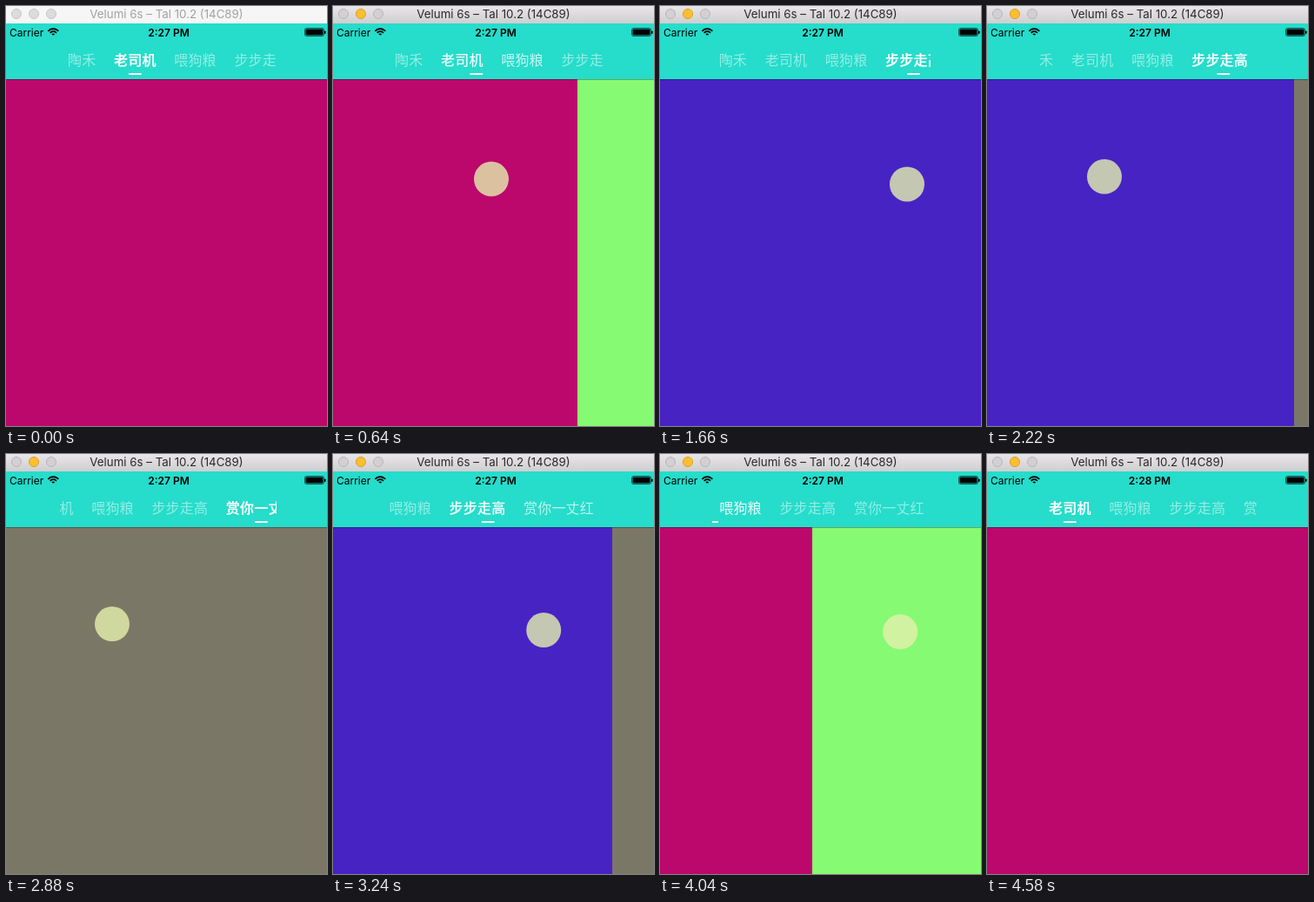
An HTML page with a canvas for the animation above (5120 ms loop, 369 px wide and 482 px high).

```html
<!DOCTYPE html>
<html lang="zh">
<head>
<meta charset="utf-8">
<style>
html, body { margin: 0; width: 369px; height: 482px; overflow: hidden; }
canvas { display: block; }
</style>
</head>
<body>
<canvas id="stage" width="369" height="482"></canvas>
<script>
const W = 369, H = 482, TITLE_H = 20, NAV_END = 84, LOOP = 5120;
const ctx = document.getElementById('stage').getContext('2d');
const UI = 'Inter, Roboto, sans-serif';
const CJK = '"Noto Sans CJK SC", "Noto Sans CJK", sans-serif';

const clamp = v => Math.max(0, Math.min(1, v));
const mix = (a, b, u) => a + (b - a) * u;
const smooth = u => u * u * (3 - 2 * u);
const easeOut = u => 1 - (1 - u) ** 2;

const pageColors = ['#2a9fd6', '#bc076c', '#86fa73', '#4823c4', '#7b7766'];
const view = { left: 60, right: 311, pad: 11 };
const charW = 16.2, gap = 20.6;
let nextX = view.left + view.pad;
const tabs = ['陶禾', '老司机', '喂狗粮', '步步走高', '赏你一丈红'].map(label => {
  const x = nextX, w = label.length * charW;
  nextX += w + gap;
  return { label, x, w, mid: x + w / 2 };
});

// Three swipes forward, three back: [start, duration]
const swipes = [[570, 560], [1190, 405], [2210, 487], [2960, 440], [3521, 355], [3950, 330]];
const SCROLL_MS = 300;

// Pointer turning points: [time, x]
const pointer = [
  [80, 395], [450, 290], [800, 100], [1180, 282], [1400, 95], [1660, 284], [2220, 135],
  [2400, 60], [2880, 122], [3120, 310], [3420, 120], [3580, 301], [3900, 130],
  [4100, 315], [4560, 395]
];

// Smallest scroll that brings a tab fully into view
function reveal(tab, scroll) {
  const toEnd = tab.x + tab.w + view.pad - view.right;
  const toStart = tab.x - view.pad - view.left;
  return Math.min(Math.max(scroll, toEnd), toStart);
}

function poseAt(t) {
  let page = 1, target = 1, scroll = 0;
  swipes.forEach(([start, duration], i) => {
    const dir = i < 3 ? 1 : -1;
    target += dir;
    page += dir * easeOut(clamp((t - start) / duration));
    const u = clamp((t - start - duration) / SCROLL_MS);
    scroll = mix(scroll, reveal(tabs[target], scroll), smooth(u));
  });
  return { page, scroll };
}

function rect(color, x, y, w, h) {
  ctx.fillStyle = color;
  ctx.fillRect(x, y, w, h);
}

function pill(color, x, y, w, h, r) {
  ctx.fillStyle = color;
  ctx.beginPath();
  ctx.roundRect(x, y, w, h, r);
  ctx.fill();
}

function disc(color, x, y, r, edge) {
  ctx.beginPath();
  ctx.arc(x, y, r, 0, Math.PI * 2);
  ctx.fillStyle = color;
  ctx.fill();
  if (!edge) return;
  ctx.lineWidth = 1;
  ctx.strokeStyle = edge;
  ctx.stroke();
}

function text(str, x, y, font, color, align = 'left') {
  ctx.font = font;
  ctx.fillStyle = color;
  ctx.textAlign = align;
  ctx.fillText(str, x, y);
}

function drawPages(page) {
  const base = Math.floor(page);
  const split = Math.round((base + 1 - page) * W);
  rect(pageColors[base], 0, NAV_END, W, H - NAV_END);
  if (split < W) rect(pageColors[base + 1], split, NAV_END, W - split, H - NAV_END);
  rect('rgba(0,0,0,.3)', 0, NAV_END, W, 1);
}

function drawTitleBar(active) {
  const g = ctx.createLinearGradient(0, 0, 0, TITLE_H);
  g.addColorStop(0, active ? '#e8e6e8' : '#f6f6f6');
  g.addColorStop(1, active ? '#d0ced0' : '#f6f6f6');
  rect(g, 0, 0, W, TITLE_H);
  const idle = active ? '#d2d0d2' : '#dcdcdc';
  const edge = active ? '#b8b6b8' : '#c6c6c6';
  for (const x of [12, 32, 52]) {
    const lit = active && x === 32;
    disc(lit ? '#fdbe2f' : idle, x, 9, 5.5, lit ? '#dea022' : edge);
  }
  const ink = active ? '#2a2a2a' : '#a2a2a2';
  text('Velumi 6s – Tal 10.2 (14C89)', 184.5, 14, '13.3px ' + UI, ink, 'center');
}

function drawStatus(t) {
  rect('#26dccb', 0, TITLE_H, W, NAV_END - TITLE_H);
  text('Carrier', 4, 35, '12px ' + UI, '#000');
  text(t < 4400 ? '2:27 PM' : '2:28 PM', 187, 35, '600 12px ' + UI, '#000', 'center');
  // Wi-Fi
  ctx.strokeStyle = '#000';
  ctx.lineWidth = 1.7;
  for (const r of [1.6, 4.8, 7.8]) {
    ctx.beginPath();
    ctx.arc(54.3, 34, r, -Math.PI * .77, -Math.PI * .23);
    ctx.stroke();
  }
  // Battery
  ctx.lineWidth = 1;
  ctx.strokeStyle = 'rgba(0,0,0,.6)';
  ctx.beginPath();
  ctx.roundRect(343.5, 25.5, 22, 9, 2);
  ctx.stroke();
  pill('#000', 344.5, 26.5, 20, 7, 1);
  pill('#000', 366, 28.5, 1.6, 3.5, 1);
}

function drawTabs(page, scroll) {
  ctx.save();
  ctx.beginPath();
  ctx.rect(view.left, 40, view.right - view.left, 44);
  ctx.clip();
  ctx.translate(-scroll, 0);
  ctx.letterSpacing = '.2px';
  tabs.forEach(({ label, x }, i) => {
    const near = clamp(1 - Math.abs(page - i));
    text(label, x, 68, '16px ' + CJK, `rgba(255,255,255,${.5 + .5 * Math.sqrt(near)})`);
    text(label, x, 68, 'bold 16px ' + CJK, `rgba(255,255,255,${.75 * near ** 3})`);
  });
  ctx.letterSpacing = '0px';
  const i = Math.min(Math.floor(page), tabs.length - 2);
  const mid = mix(tabs[i].mid, tabs[i + 1].mid, page - i);
  pill('#fff', mid - 7.5, 77, 15, 2, 1);
  ctx.restore();
}

function drawPointer(t) {
  const i = pointer.findIndex(p => p[0] > t);
  if (i < 1) return;
  const [t0, x0] = pointer[i - 1], [t1, x1] = pointer[i];
  const x = mix(x0, x1, smooth((t - t0) / (t1 - t0)));
  disc('rgba(228,240,173,.8)', x, 188 + .058 * x, 20);
}

function draw(t) {
  const { page, scroll } = poseAt(t);
  drawPages(page);
  drawTitleBar(t >= 300);
  drawStatus(t);
  drawTabs(page, scroll);
  drawPointer(t);
}

const begin = performance.now();
function tick() {
  draw((performance.now() - begin) % LOOP);
  requestAnimationFrame(tick);
}
tick();
</script>
</body>
</html>
```
